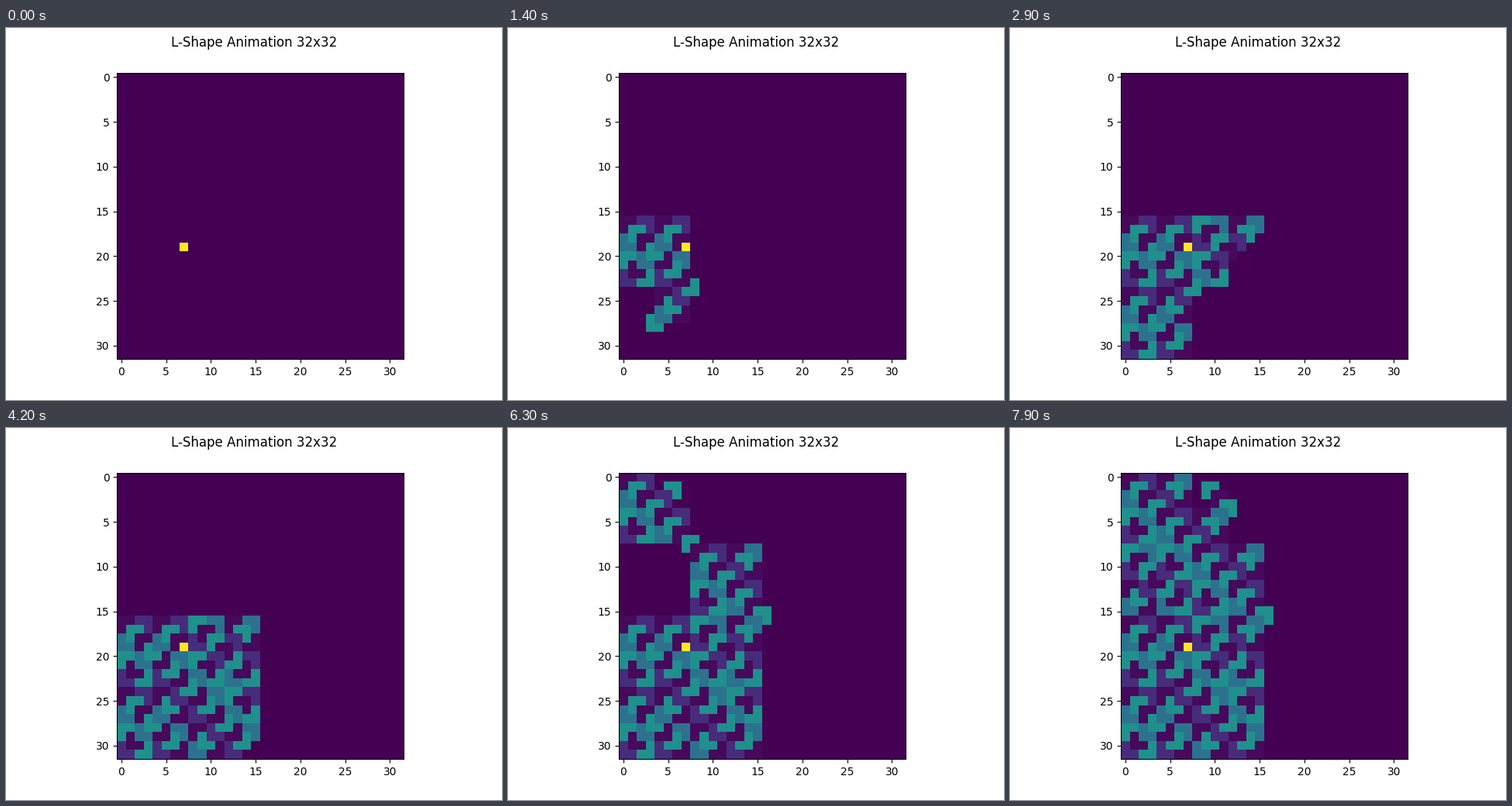
A matplotlib script for the animation above (8000 ms loop, 640 px wide and 480 px high).

```python
import matplotlib.pyplot as plt
import numpy as np
from matplotlib.animation import FuncAnimation

SIZE = 32
HOLE = (19, 7)
FRAMES = 160
HOLE_VALUE = 40
EVEN, ODD = (1, 20), (5, 15)      # tile values, picked by the swap state
QUADS = [(0, 0), (1, 0), (0, 1), (1, 1)]


def tile(row, col, size, hole, swap=0, quad=(0, 0)):
    """Yield (cells, value) for each L-tile, in the order of placement."""
    half = size // 2
    hole_quad = (int(hole[0] >= row + half), int(hole[1] >= col + half))
    # the four cells around the middle, one per quadrant
    middle = {q: (row + half - 1 + q[0], col + half - 1 + q[1]) for q in QUADS}
    cells = [middle[q] for q in QUADS if q != hole_quad]

    if size == 2:
        pair = ODD if sum(quad) == 1 else EVEN
        yield cells, pair[swap]
        return

    swapped_quad = (1, 0) if hole_quad[1] else (0, 1)

    def child(q):
        inner_hole = hole if q == hole_quad else middle[q]
        return tile(row + q[0] * half, col + q[1] * half, half,
                    inner_hole, swap ^ (q == swapped_quad), q)

    yield from child(hole_quad)
    yield cells, EVEN[1 - swap]
    for q in QUADS:
        if q != hole_quad:
            yield from child(q)


steps = list(tile(0, 0, SIZE, HOLE))


def board(count):
    grid = np.zeros((SIZE, SIZE))
    grid[HOLE] = HOLE_VALUE
    for cells, value in steps[:count]:
        for cell in cells:
            grid[cell] = value
    return grid


fig, ax = plt.subplots(figsize=(6.4, 4.8), dpi=100)
fig.suptitle(f"L-Shape Animation {SIZE}x{SIZE}")
image = ax.imshow(board(0), cmap="viridis", vmin=0, vmax=HOLE_VALUE)


def update(frame):
    image.set_data(board(frame))
    return [image]


anim = FuncAnimation(fig, update, frames=FRAMES, interval=50, repeat=True)
plt.show()
```
